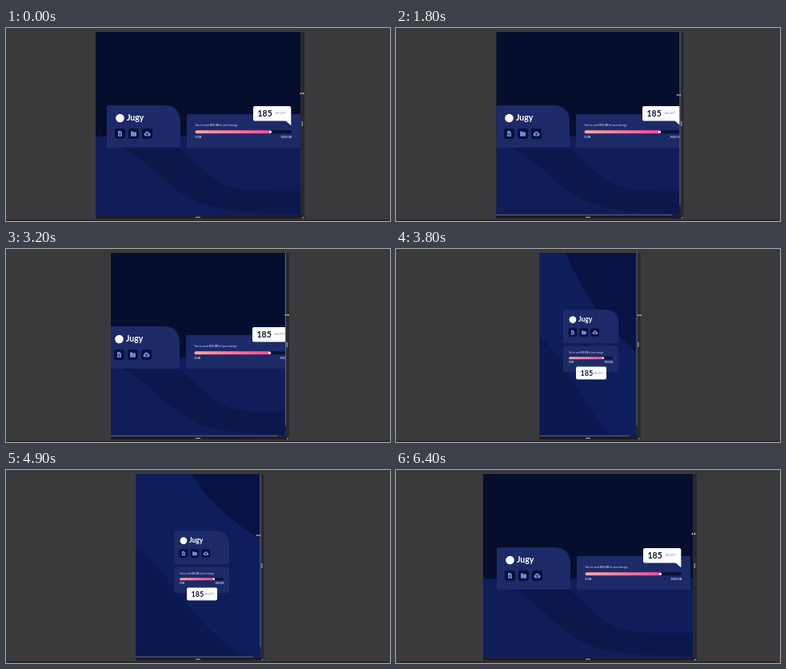
Recreate the animation shown at these times as an HTML page. Size 480x242 px, loop 6.5 s.

```html
<!DOCTYPE html>
<html lang="en">
<head>
<meta charset="utf-8">
<title>Responsive storage card</title>
<style>
  html, body { margin: 0; width: 100%; height: 100%; overflow: hidden; background: #3a3a3d; }
  svg { display: block; width: 480px; height: 242px; font-family: Lato, "Open Sans", sans-serif; }
</style>
</head>
<body>
<svg viewBox="0 0 480 242">
  <defs>
    <linearGradient id="pink"><stop stop-color="#fba8a0"/><stop offset="1" stop-color="#f9479f"/></linearGradient>
    <clipPath id="view"><rect id="viewBox" y="5" height="230"/></clipPath>
  </defs>
  <rect width="480" height="242" fill="#3a3a3d"/>
  <rect y="240" width="480" height="2" fill="#30272b"/>
  <rect id="frame" y="5" height="234" fill="#29292d"/>
  <rect id="foot" y="235" height="4" fill="#1d1d23"/>
  <g clip-path="url(#view)">
    <g id="desktop">
      <path d="M0 5H480V136H0Z" fill="#050f2d"/>
      <path d="M0 136H480V235H0Z" fill="#101d59"/>
      <path d="M135 147C180 160 200 207 250 222S330 230 390 235V205C320 203 290 209 262 190S225 150 200 140Z" fill="#0c184c"/>
      <g id="wide"></g>
    </g>
    <g id="mobile">
      <path d="M0 5H480V235H0Z" fill="#0e1d5b"/>
      <path id="upper" fill="#081344"/>
      <path id="lower" fill="#0b1951"/>
      <g id="narrow"></g>
    </g>
  </g>
  <g id="bars" fill="#66697a">
    <rect id="vBar" y="5" width="1" height="217"/>
    <rect id="hBar" y="233.8" height="1"/>
  </g>
  <g fill="#9a9a9e">
    <rect x="237" y="236.7" width="6" height="1.3"/>
    <rect id="grip" y="117" width="1.3" height="6"/>
    <path id="corner" d="M0 238.5l2.5-2.5v2.5z"/>
  </g>
  <path id="cursor" d="M-3 0l2-1.6v1.1h2v-1.1L3 0l-2 1.6V.5h-2v1.1z" fill="#fff" stroke="#111" stroke-width=".4"/>
</svg>
<script>
const $ = id => document.getElementById(id);
const set = (id, attrs) => { for (const k in attrs) $(id).setAttribute(k, attrs[k]); };

const icons = [
  'M4 3h3l2 2v5H4zM5.2 6.2v.7h2.6v-.7zM5.2 7.8v.7h2.6v-.7z',
  'M3 3.5h2.6l1 1H10v5.2H3z',
  'M4.2 9.5a2 2 0 0 1-.2-3.9a2.6 2.6 0 0 1 5-.2a2.1 2.1 0 0 1 .2 4.1zM6.5 5.4l-1.6 1.7h1v1.5h1.2V7.1h1z'
];

const brand = (x, y, s) => `<g transform="translate(${x} ${y}) scale(${s})">
  <circle cx="16.5" cy="16" r="5.3" fill="#fff"/>
  <text x="25" y="19" font-size="10.5" font-weight="700" fill="#fff">Jugy</text>
  ${icons.map((d, i) => `<g transform="translate(${10 + 17 * i} 29)" fill="#7486e4">
    <rect width="13" height="13" rx="3" fill="#080f35"/><path fill-rule="evenodd" d="${d}"/></g>`).join('')}</g>`;

// Caption, progress bar and its two labels
const storage = (x, y, w, h, size) => `<g fill="#d3d7f5" font-size="${size}">
  <text x="${x}" y="${y - 2.1 * size}">You’ve used <tspan font-weight="700">815 GB</tspan> of your storage</text>
  <rect x="${x}" y="${y - h / 2}" width="${w}" height="${h}" rx="${h / 2}" fill="#080f35"/>
  <rect x="${x}" y="${y - h / 2}" width="${w * .79}" height="${h}" rx="${h / 2}" fill="url(#pink)"/>
  <circle cx="${x + w * .78}" cy="${y}" r="${h * .4}" fill="#fff"/>
  <text x="${x}" y="${y + 2.4 * size}" font-weight="700">0 GB</text>
  <text x="${x + w}" y="${y + 2.4 * size}" font-weight="700" text-anchor="end">1000 GB</text></g>`;

const badge = (x, y, w, h, s) => `<rect x="${x}" y="${y}" width="${w}" height="${h}" rx="2" fill="#fff"/>
  <text x="${x + 5.5}" y="${y + h / 2 + 3.9 * s}" font-size="${10.5 * s}" font-weight="700" fill="#101632">185</text>
  <text x="${x + w * .57}" y="${y + h / 2 + 1.2 * s}" font-size="${3.7 * s}" fill="#8086a3">GB LEFT</text>`;

$('wide').innerHTML = `
  <path d="M126 150V100q0-3 3-3H197q21 0 21 21V150z" fill="#1c2a68"/>
  <rect x="226" y="108" width="142" height="42" rx="1.5" fill="#1c2a68"/>
  ${brand(126, 97, 1)}${storage(236.5, 130.3, 120.5, 4, 3.4)}
  <path d="M348 115h8.3v7.3z" fill="#fff"/>${badge(309, 98, 47.3, 18.5, 1)}`;
$('narrow').innerHTML = `
  <path d="M210 116V78q0-2 2-2H262q17 0 17 17V116q0 2-2 2H212q-2 0-2-2z" fill="#1c2a68"/>
  <rect x="210" y="121.5" width="69" height="32.5" rx="2" fill="#1c2a68"/>
  ${brand(208.4, 75.5, .82)}${storage(217, 136.8, 55, 3, 2.75)}
  ${badge(226, 147.5, 38, 16, .86)}`;

// Time, half width of the page, pointer offset from its right edge, pointer y
const keys = [
  [0, 128, 2, 82], [100, 127, 2, 82], [700, 109, 4, 82], [1100, 85.5, 6, 82],
  [1250, 86, 3, 82], [1600, 123, 2, 83], [1800, 114.5, -1, 84], [2100, 102, 3, 83],
  [2600, 80, 7, 82], [2800, 73, 3, 82], [3300, 118, 2, 83], [3800, 60.5, 4, 83],
  [3900, 63, 3, 82], [4500, 143, 3, 82], [4900, 77.5, -2, 82], [5050, 72, 0, 82],
  [5600, 122, 2, 81], [5900, 130, 1, 80], [6100, 131, 2, 80], [6200, 131, 2, 80],
  [6300, 131, 1, 80], [6500, 131, 1, 80]
];

function pose(t) {
  const i = keys.findIndex(k => k[0] > t), a = keys[i - 1], b = keys[i];
  const p = (t - a[0]) / (b[0] - a[0]);
  return a.map((v, j) => v + (b[j] - v) * p);
}

function draw(now) {
  const t = Math.floor(now % 6500 / 100) * 100;
  const [, half, dx, cy] = pose(t);
  const left = 240 - half, right = 240 + half, width = 2 * half;
  const wide = half > 95;
  set('viewBox', { x: left, width });
  set('frame', { x: left, width: width + 5 });
  set('foot', { x: left, width: width + 5 });
  set('desktop', { display: wide ? 'inline' : 'none' });
  set('mobile', { display: wide ? 'none' : 'inline' });
  set('wide', { transform: `translate(${half < 120 ? -1 : 0})` });
  set('narrow', { transform: `translate(${half < 70 ? -1 : 0})` });

  // Background bands steepen as the page narrows
  const k = (half - 60.5) / 25;
  const top = left + width * (.27 + .26 * k), side = 130 - 65 * k;
  const start = 110 - 17 * k, end = left + width * (.75 + .2 * k);
  set('upper', { d: `M${top} 5Q${top + (right - top) * .35} ${5 + (side - 5) * .6} ${right} ${side}V5Z` });
  set('lower', { d: `M${left} ${start}C${left + width * .25} ${start + 20} ${left + width * .4} 190 ${end} 235H${left}Z` });

  set('bars', { display: half < 127 ? 'inline' : 'none' });
  set('vBar', { x: right });
  set('hBar', { x: left, width: width - 9 });
  set('grip', { x: right + 1.7 });
  set('corner', { transform: `translate(${right + 1.5})` });
  set('cursor', { transform: `translate(${right + dx} ${cy})` });
}

const begin = performance.now();
function tick() {
  draw(performance.now() - begin);
  requestAnimationFrame(tick);
}
tick();
</script>
</body>
</html>
```
